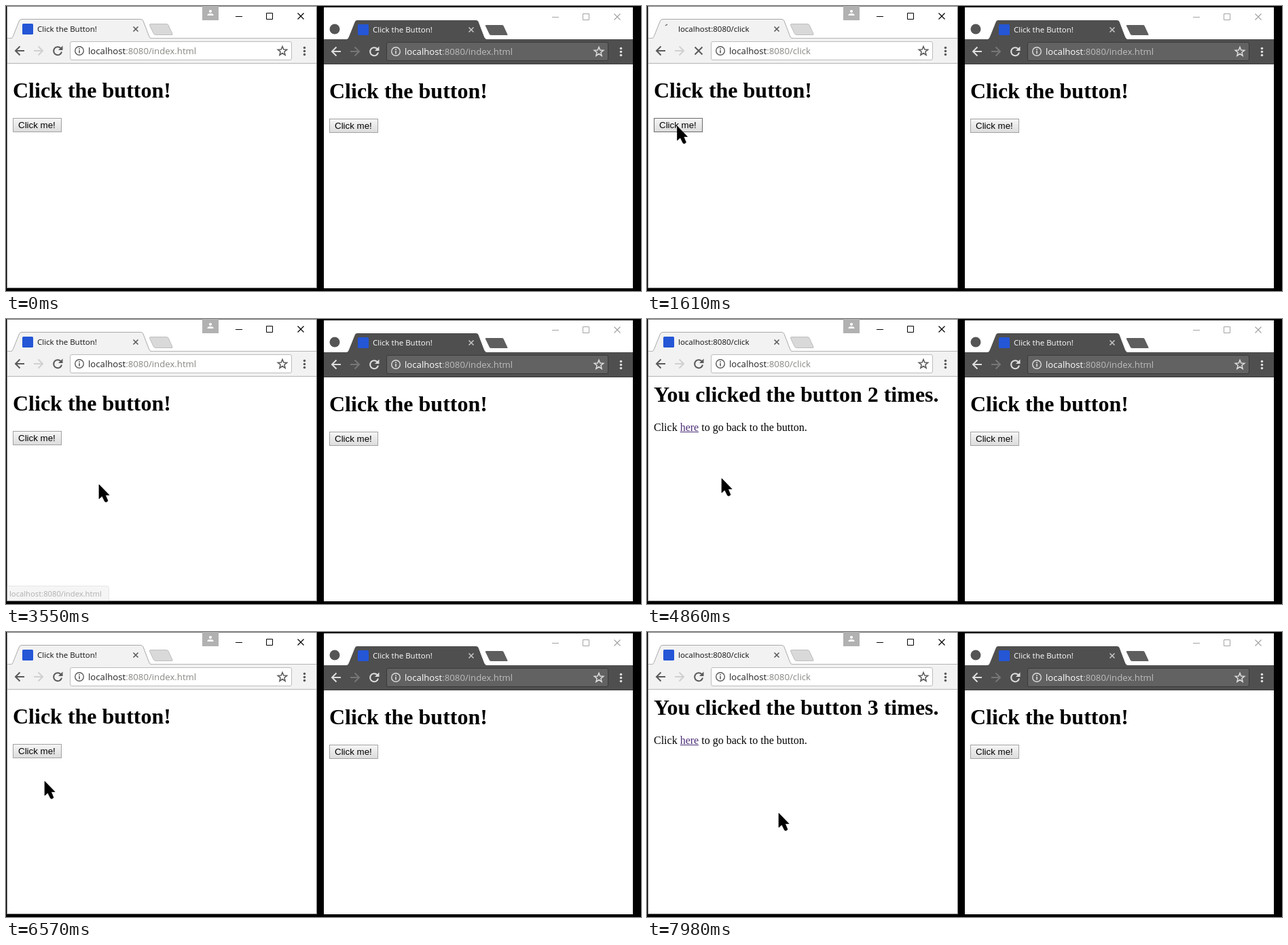
An HTML page that plays this animation: 935 by 420 pixels, repeating every 8 s.

```html
<!DOCTYPE html>
<html lang="en">
<head>
<meta charset="utf-8">
<title>Click the Button!</title>
<style>
  html, body { margin: 0; width: 100%; height: 100%; overflow: hidden; background: #000; }
  svg { display: block; width: 100%; height: 100%; }
  text { white-space: pre; }
  .ui { font-family: "Open Sans", "Noto Sans", sans-serif; }
  .page { font-family: "Liberation Serif", "Times New Roman", serif; }
  .page .btn { font: 13.333px "Liberation Sans", Arial, sans-serif; }
  .h1 { font-size: 32px; font-weight: bold; }
</style>
</head>
<body>
<svg id="stage" viewBox="0 0 935 420">
  <defs>
    <linearGradient id="face" x2="0" y2="1">
      <stop stop-color="#f6f6f6"/><stop offset="1" stop-color="#dcdcdc"/>
    </linearGradient>
    <linearGradient id="pressed" x2="0" y2="1">
      <stop stop-color="#dcdcdc"/><stop offset="1" stop-color="#f0f0f0"/>
    </linearGradient>
  </defs>
</svg>
<script>
const LOOP = 8000, STEP = 77.2;
const stage = document.getElementById('stage');
const $ = id => document.getElementById(id);

const LIGHT = {
  frame: '#777', bar: '#f2f2f2', edge: '#a9a9a9', top: '#b5b5b5', line: '#b5b5b5',
  plus: '#d9d9d9', plusEdge: '#bdbdbd', box: '#fff', boxEdge: '#bcbcbc', icon: '#5a5a5a',
  off: '#d0d0d0', title: '#111', host: '#222', path: '#858982', win: '#000', close: '#5a5a5a'
};
const DARK = {
  frame: 'none', bar: '#4f4f4f', edge: '#fff', top: '#fff', line: '#3c3c3c',
  plus: '#5e5e5e', plusEdge: '#fff', box: '#626262', boxEdge: '#3a3a3a', icon: '#dedede',
  off: '#777', title: '#fff', host: '#fff', path: '#bdbdbd', win: '#a3a3a3', close: '#c4c4c4'
};

const stroke = (d, color, width = 2) =>
  `<path d="${d}" fill="none" stroke="${color}" stroke-width="${width}"/>`;

function star(cx, cy, color) {
  const pts = Array.from({ length: 10 }, (_, i) => {
    const a = -Math.PI / 2 + i * Math.PI / 5, r = i % 2 ? 3 : 7;
    return [cx + r * Math.cos(a), cy + r * Math.sin(a)].map(v => v.toFixed(1));
  });
  return stroke(`M${pts.join('L')}Z`, color, 1.5);
}

function tab(id, c, shift) {
  return `<g transform="translate(${shift} 0)">
    <path d="M7 48C10 47 10 45 11 43L19 23Q20 19.5 23 19.5H198Q201 19.5 202 22L210 43Q211 47 214 48"
      fill="${c.bar}" stroke="${c.edge}"/>
    <path d="M213 26.5H236Q238 26.5 239 28L245 41Q245.5 42.5 244 42.5H221Q218.5 42.5 217.5 41L211.5 28.5Q211 26.5 213 26.5Z"
      fill="${c.plus}" stroke="${c.plusEdge}"/>
    <rect id="${id}Icon" x="24" y="26" width="16" height="16" rx="1.5" fill="#2456d6"/>
    <text id="${id}Title" class="ui" x="46" y="38" font-size="11.5" fill="${c.title}">Click the Button!</text>
    ${stroke('M187.5 30.5l7 7m0-7l-7 7', c.close, 1.6)}
  </g>`;
}

function toolbar(id, c) {
  return `<rect x="2" y="48" width="455" height="36" fill="${c.bar}"/>
    <path d="M2 84.5H457" stroke="${c.line}"/>
    ${stroke('M27 66H14.5M20.5 59.5L14 66L20.5 72.5', c.icon)}
    ${stroke('M41 66H53.5M47.5 59.5L54 66L47.5 72.5', c.off)}
    <g id="${id}Reload">${stroke('M80.6 62.2A6 6 0 1 0 82 67.5', c.icon)}
      <path d="M83.5 58.5V65H77Z" fill="${c.icon}"/></g>
    <g id="${id}Stop" visibility="hidden">${stroke('M70.5 60.5l11 11m0-11l-11 11', c.icon)}</g>
    <rect x="94.5" y="52.5" width="326" height="27" rx="2.5" fill="${c.box}" stroke="${c.boxEdge}"/>
    <circle cx="108" cy="66" r="6.3" fill="none" stroke="${c.icon}" stroke-width="1.4"/>
    ${stroke('M108 65V69.5M108 62.3V63.9', c.icon, 1.6)}
    <text class="ui" x="121" y="71" font-size="13.2" fill="${c.path}"><tspan fill="${c.host}">localhost</tspan>:8080/<tspan id="${id}Path">index.html</tspan></text>
    ${star(407, 66.5, c.icon)}
    ${[61.5, 66.5, 71.5].map(y => `<circle cx="439.5" cy="${y}" r="1.8" fill="${c.icon}"/>`).join('')}`;
}

const formPage = id => `<g id="${id}Form" class="page">
    <text class="h1" x="10" y="135">Click the button!</text>
    <rect id="${id}Btn" x="10.5" y="165.5" width="71" height="20" fill="url(#face)" stroke="#a2a2a2"/>
    <text class="btn" x="18" y="180">Click me!</text>
  </g>`;

function browser(id, c, x, y, tabShift) {
  return `<g transform="translate(${x} ${y})">
    <rect x="2" y="1" width="455" height="414" fill="#fff"/>
    <path d="M2 47.5H457" stroke="${c.top}"/>
    ${tab(id, c, tabShift)}${toolbar(id, c)}
    ${stroke('M338 15.5H348M383.5 10.5h9v9h-9z', c.win, 1)}
    ${stroke('M429.5 10.5l9 9m0-9l-9 9', c.win, 1.2)}
    ${formPage(id)}
    <rect x="1.5" y=".5" width="456" height="415" fill="none" stroke="${c.frame}"/>
  </g>`;
}

stage.innerHTML += `<rect width="935" height="420"/>
  ${browser('a', LIGHT, 0, 0, 0)}
  ${browser('b', DARK, 466, 1, 28)}
  <circle cx="484" cy="34" r="7.5" fill="#555"/>
  <rect x="289" width="24" height="21" fill="#b1b1b1"/>
  <circle cx="301" cy="7.8" r="2.1" fill="#fff"/>
  <path d="M296.5 14V13Q297 11 301 11Q305 11 305.5 13V14Z" fill="#fff"/>
  <path id="spin" fill="none" stroke="#777" stroke-width="1.5"/>
  <g id="result" class="page">
    <text class="h1" x="10" y="122">You clicked the button <tspan id="count">1</tspan> times.</text>
    <text x="10" y="165" font-size="16">Click <tspan id="link">here</tspan> to go back to the button.</text>
    <path id="underline" d="M48.7 166.5H76"/>
  </g>
  <g id="status">
    <path d="M2 393.5H149Q151.5 393.5 151.5 396V415H2Z" fill="#ececec" stroke="#cfcfcf"/>
    <text class="ui" x="5" y="409" font-size="11.25" fill="#5f5f5f">localhost:8080/index.html</text>
  </g>
  <g id="pointer">
    <path id="arrow" d="M0 0V21L4.5 17L8.5 25Q10.5 27 13 24L9.5 15.5H15Z" stroke="#000" stroke-width=".7"/>
    <g id="beam">${stroke('M-5-9.5H-2L0-8L2-9.5H5M0-9V9M-5 9.5H-2L0 8L2 9.5H5', '#000', 3)}</g>
    <g id="hand"><path d="M-2 1Q0-1 2 1V7L11 9Q12.5 10 12 13L10 19V24H-1V20L-6 13Q-6 10-4 10.5L-2 13Z"/>
      ${stroke('M5 9v4M8.5 10v3', '#fff', 0.8)}</g>
  </g>`;

// step, x, y, pointer shape from that step on
const MOVES = [
  [1, 267, 386, 'arrow'], [4, 190, 285, 'arrow'], [7, 110, 180, 'arrow'], [9, 72, 138, 'beam'],
  [10, 60, 145, 'arrow'], [11, 55, 155, 'arrow'], [14, 44.5, 177, 'arrow'], [22, 44.5, 177, 'arrow'],
  [25, 147, 248, 'arrow'], [29, 147, 248, 'arrow'], [35, 80, 166, 'beam'], [37, 70, 156, 'hand'],
  [38, 70, 156, 'hand'], [40, 70, 163, 'hand'], [43, 70, 163, 'hand'], [44, 82, 180, 'arrow'],
  [46, 137, 244, 'arrow'], [48, 130, 240, 'arrow'], [54, 60, 172, 'arrow'], [55, 60, 174, 'arrow'],
  [60, 60, 174, 'arrow'], [63, 110, 235, 'arrow'], [64, 107, 238, 'arrow'], [67, 67, 172, 'arrow'],
  [68, 62, 171, 'arrow'], [70, 58, 165, 'hand'], [76, 58, 165, 'hand'], [77, 64, 180, 'arrow'],
  [80, 95, 255, 'arrow'], [85, 57, 220, 'arrow'], [89, 45, 176, 'arrow'], [94, 45, 176, 'arrow'],
  [98, 150, 306, 'arrow'], [101, 187, 286, 'arrow'], [103, 194, 267, 'arrow']
];
const PAGES = [[0, 0], [23, 1], [42, 0], [61, 2], [75, 0], [95, 3]];
const PRESSES = [18, 57, 91];
const HINTS = [[39, 44], [72, 77]];

const last = (list, k) => list.filter(e => e[0] <= k).pop();
const clamp = v => Math.max(0, Math.min(1, v));
const show = (id, on) => $(id).setAttribute('visibility', on ? 'visible' : 'hidden');

function pointerAt(k) {
  const from = last(MOVES, k);
  if (!from) return null;
  const to = MOVES[MOVES.indexOf(from) + 1] || from;
  const p = to === from ? 0 : (k - from[0]) / (to[0] - from[0]);
  return { x: from[1] + (to[1] - from[1]) * p, y: from[2] + (to[2] - from[2]) * p, shape: from[3] };
}

function spinner(age) {
  const at = deg => {
    const a = deg * Math.PI / 180;
    return `${32 + 7 * Math.cos(a)} ${34 + 7 * Math.sin(a)}`;
  };
  const start = -85 - age * 20;
  return `M${at(start)}A7 7 0 0 0 ${at(start - 18 - age * 12)}`;
}

function draw(t) {
  const k = Math.floor(t / STEP + 0.22);
  const page = last(PAGES, k)[1];
  const press = PRESSES.find(p => k >= p && k < p + 5 && !page);
  const loading = press !== undefined && k >= press + 2;
  const away = page > 0 || loading;

  show('aForm', !page);
  show('result', page);
  $('count').textContent = page || 1;
  const linkColor = page === 1 ? '#34568c' : '#4c2f78';
  $('link').setAttribute('fill', linkColor);
  $('underline').setAttribute('stroke', linkColor);

  $('aTitle').textContent = away ? 'localhost:8080/click' : 'Click the Button!';
  $('aPath').textContent = away ? 'click' : 'index.html';
  show('aIcon', !loading);
  show('aReload', !loading);
  show('aStop', loading);
  show('spin', loading);
  if (loading) $('spin').setAttribute('d', spinner(k - press - 2));

  const p = pointerAt(k);
  show('pointer', p);
  if (p) {
    $('pointer').setAttribute('transform', `translate(${p.x} ${p.y})`);
    for (const s of ['arrow', 'beam', 'hand']) $(s).setAttribute('display', s === p.shape ? 'inline' : 'none');
  }

  const hover = p && p.shape === 'arrow' && p.x > 10 && p.x < 82 && p.y > 165 && p.y < 186;
  const down = press !== undefined && !loading;
  $('aBtn').setAttribute('stroke', hover ? '#6a6a6a' : '#a2a2a2');
  $('aBtn').setAttribute('fill', down ? 'url(#pressed)' : 'url(#face)');

  const hint = Math.max(...HINTS.map(([on, off]) =>
    Math.min(clamp((k - on + 1) / 2), clamp(1 - (k - off + 1) / 6))));
  $('status').setAttribute('opacity', hint);
}

const begin = performance.now();
function tick() {
  draw((performance.now() - begin) % LOOP);
  requestAnimationFrame(tick);
}
tick();
</script>
</body>
</html>
```
